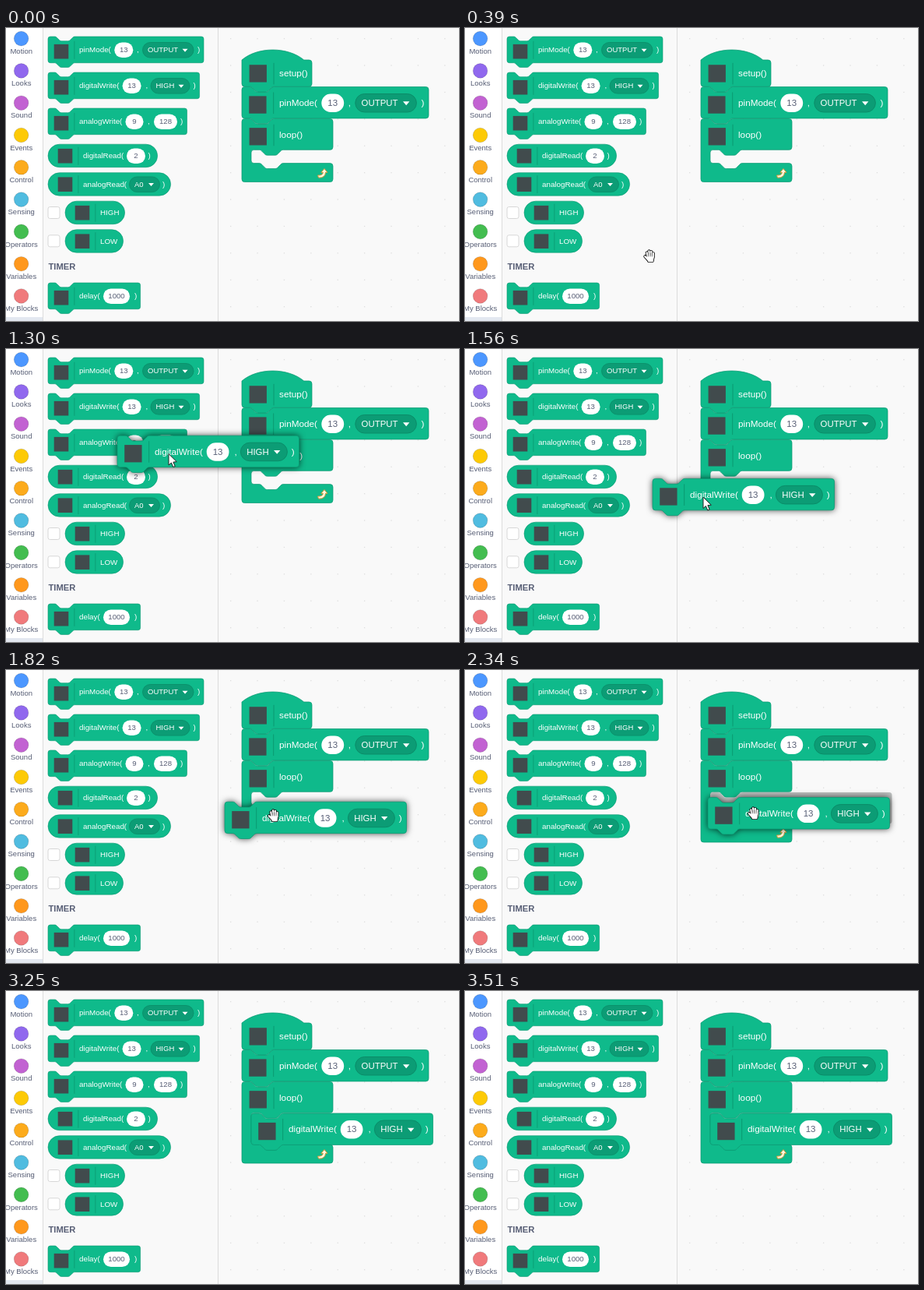
Recreate the animation shown at these times as an HTML page with a canvas. Size 582 px wide and 376 px high, loop 3.9 s.

```html
<!DOCTYPE html>
<html lang="en">
<head>
<meta charset="utf-8">
<title>Block editor</title>
<style>
html, body { margin: 0; width: 100%; height: 100%; overflow: hidden; background: #f9f9f9; }
canvas { display: block; width: 582px; height: 376px; }
</style>
</head>
<body>
<canvas id="stage"></canvas>
<script>
const W = 582, H = 376, LOOP = 3900, STEP = 130;
const GREEN = '#0fba8b', EDGE = '#0b9871', FIELD = '#0c9c75', TILE = '#414b4d';
const FONT = '"Liberation Sans", Arial, sans-serif';
const BIG = 1.2;

const canvas = document.getElementById('stage');
const c = canvas.getContext('2d');
const dpr = window.devicePixelRatio || 1;
canvas.width = W * dpr;
canvas.height = H * dpr;

const CATEGORIES = [
  ['Motion', '#4c97ff'], ['Looks', '#9068ee'], ['Sound', '#c262d2'],
  ['Events', '#fdca06'], ['Control', '#fcab1c'], ['Sensing', '#50bce0'],
  ['Operators', '#43bd50'], ['Variables', '#ff981d'], ['My Blocks', '#f07a7c']
];

// Block parts: label, number and menu, each with its offset in the block
const label = (x, s) => () => text(s, x, 0, 9.8, '#fff');
const number = (x, w, s) => () => {
  pill(x - w / 2, -9.8, w, 19.6, '#fff');
  text(s, x, 0, 9.6, '#575e75', 'center');
};
const menu = (x, w, s) => () => {
  pill(x, -9.8, w, 19.6, FIELD, '#0b8c68');
  text(s, x + 6.5, 0, 9.5, '#fff');
  c.fillStyle = '#fff';
  c.beginPath();
  c.moveTo(x + w - 14.5, -1.6);
  c.lineTo(x + w - 7.5, -1.6);
  c.lineTo(x + w - 11, 2.4);
  c.fill();
};

const stack = (w, ...parts) => ({ shape: stackPath, w, h: 33.7, mid: 17.3, icon: 19.2, left: 17, parts });
const reporter = (w, ...parts) => ({ shape: roundPath, w, h: 29.5, mid: 15, icon: 15, left: 22, parts });

const pinMode = stack(200, label(40, 'pinMode('), number(97.3, 24, '13'), label(114, ','),
  menu(121.5, 65.5, 'OUTPUT'), label(192, ')'));
const digitalWrite = stack(194.6, label(40, 'digitalWrite('), number(107.6, 24, '13'), label(125.5, ','),
  menu(132, 50, 'HIGH'), label(186.5, ')'));
const analogWrite = stack(178.5, label(40, 'analogWrite('), number(111, 23, '9'), label(128, ','),
  number(151, 30, '128'), label(170, ')'));
const delay = stack(118.6, label(40, 'delay('), number(88, 34, '1000'), label(111, ')'));
const digitalRead = reporter(140.6, label(45, 'digitalRead('), number(113, 24, '2'), label(128.5, ')'));
const analogRead = reporter(157.6, label(45, 'analogRead('), menu(104.5, 39, 'A0'), label(147, ')'));
const high = reporter(76.6, label(45, 'HIGH'));
const low = reporter(74.6, label(45, 'LOW'));
const setup = { shape: hatPath, w: 75, h: 28.5, mid: 14.7, icon: 14.5, left: 17.3, parts: [label(40, 'setup()')] };
const loopBlock = mouth => ({
  shape: loopPath, w: 97.5, h: 33.2 + mouth + 19.9, mouth, mid: 17.5, icon: 19, left: 17.3,
  parts: [label(40, 'loop()')]
});

function text(s, x, y, size, color, align = 'left', weight = 'normal') {
  c.font = `${weight} ${size}px ${FONT}`;
  c.textAlign = align;
  c.textBaseline = 'middle';
  c.fillStyle = color;
  c.fillText(s, x, y + 0.4);
}

function pill(x, y, w, h, fill, line, r = h / 2) {
  c.beginPath();
  c.roundRect(x, y, w, h, r);
  c.fillStyle = fill;
  c.fill();
  if (line) {
    c.lineWidth = 0.8;
    c.strokeStyle = line;
    c.stroke();
  }
}

// Connector bump, drawn rightwards (d = 1) or leftwards (d = -1)
function notch(x, y, d) {
  const s = 0.715, X = v => x + v * s * d, Y = v => y + v * s;
  const curve = (a, b, e, f, g, h) => c.bezierCurveTo(X(a), Y(b), X(e), Y(f), X(g), Y(h));
  c.lineTo(x, y);
  curve(2, 0, 3, 1, 4, 2);
  c.lineTo(X(8), Y(6));
  curve(9, 7, 10, 8, 12, 8);
  c.lineTo(X(24), Y(8));
  curve(26, 8, 27, 7, 28, 6);
  c.lineTo(X(32), Y(2));
  curve(33, 1, 34, 0, 36, 0);
}

const IN = 8.6, OUT = 34.3;

function topEdge() {
  c.moveTo(0, 3);
  c.arcTo(0, 0, 3, 0, 3);
  notch(IN, 0, 1);
}

function sides({ w, h }) {
  c.arcTo(w, 0, w, h, 3);
  c.arcTo(w, h, 0, h, 3);
  notch(OUT, h, -1);
  c.arcTo(0, h, 0, 0, 3);
}

function stackPath(b) {
  topEdge();
  sides(b);
}

function hatPath(b) {
  c.moveTo(0, 0);
  c.bezierCurveTo(17, -14.4, 49, -14.4, 66.5, 0);
  sides(b);
}

function loopPath({ w, h, mouth }) {
  const a = 33.2, e = a + mouth, arm = 10;
  topEdge();
  c.arcTo(w, 0, w, a, 3);
  c.arcTo(w, a, arm, a, 3);
  notch(arm + OUT, a, -1);
  c.arcTo(arm, a, arm, e, 3);
  c.arcTo(arm, e, w, e, 3);
  notch(arm + IN, e, 1);
  c.arcTo(w, e, w, h, 3);
  c.arcTo(w, h, 0, h, 3);
  c.arcTo(0, h, 0, 0, 3);
}

function roundPath({ w, h }) {
  c.roundRect(0, 0, w, h, h / 2);
}

function block(b, x, y, k = 1, lifted = false) {
  c.save();
  c.translate(x, y);
  c.scale(k, k);
  c.beginPath();
  b.shape(b);
  c.closePath();
  c.save();
  if (lifted) {
    c.shadowColor = 'rgba(0,0,0,.75)';
    c.shadowBlur = 8 * dpr;
  }
  c.fillStyle = GREEN;
  c.fill();
  c.restore();
  c.strokeStyle = EDGE;
  c.lineWidth = 0.6;
  c.stroke();
  c.fillStyle = TILE;
  c.fillRect(b.left - 9.3, b.icon - 9.3, 18.6, 18.6);
  c.fillStyle = EDGE;
  c.fillRect(b.left + 16.5, b.mid - 11.5, 0.8, 23);
  c.translate(0, b.mid);
  b.parts.forEach(draw => draw());
  c.restore();
}

function ghost(b, x, y) {
  c.save();
  c.translate(x, y);
  c.scale(BIG, BIG);
  c.beginPath();
  b.shape(b);
  c.fillStyle = '#bcbfbe';
  c.fill();
  c.restore();
}

function repeatArrow(x, y) {
  c.save();
  c.translate(x, y);
  c.lineJoin = 'round';
  c.beginPath();
  c.moveTo(-5.5, 2.5);
  c.quadraticCurveTo(1, 3, 1.3, -1.2);
  c.lineTo(-1.2, -1.2);
  c.lineTo(3, -6);
  c.lineTo(7, -1.2);
  c.lineTo(4.6, -1.2);
  c.quadraticCurveTo(4, 6.2, -4.5, 5.6);
  c.closePath();
  c.fillStyle = '#fff6df';
  c.strokeStyle = '#c99a35';
  c.lineWidth = 1;
  c.fill();
  c.stroke();
  c.restore();
}

function hand(x, y) {
  c.save();
  c.translate(x, y);
  c.lineCap = c.lineJoin = 'round';
  for (const [grow, color] of [[1.8, '#111'], [0, '#fff']]) {
    c.strokeStyle = c.fillStyle = color;
    c.lineWidth = 2.3 + grow;
    c.beginPath();
    for (const [x0, y0] of [[-3.6, -4.6], [-0.9, -6.6], [1.9, -6], [4.5, -3.8]]) {
      c.moveTo(x0, y0);
      c.lineTo(x0 * 0.8 + 0.6, 1.5);
    }
    c.moveTo(-6, 0.2);
    c.lineTo(-2, 4.5);
    c.stroke();
    c.beginPath();
    c.moveTo(-2.6, 0.5);
    c.lineTo(4.2, 0.5);
    c.lineTo(3.4, 6);
    c.lineTo(-1.2, 6);
    c.closePath();
    c.fill();
    c.stroke();
  }
  c.strokeStyle = '#333';
  c.lineWidth = 0.7;
  c.beginPath();
  for (const fx of [-2, 0.6, 3]) {
    c.moveTo(fx, -4);
    c.lineTo(fx, 0);
  }
  c.stroke();
  c.restore();
}

function arrow(x, y) {
  c.save();
  c.translate(x, y);
  c.beginPath();
  [[0, 0], [0, 14.5], [3.4, 11.5], [5.8, 17], [8.2, 16], [5.9, 10.6], [10.3, 10.2]]
    .forEach(p => c.lineTo(...p));
  c.closePath();
  c.fillStyle = '#fff';
  c.strokeStyle = '#222';
  c.lineWidth = 1;
  c.fill();
  c.stroke();
  c.restore();
}

function along(path, t) {
  let i = 0;
  while (i < path.length - 2 && t > path[i + 1][0]) i++;
  const [t0, x0, y0] = path[i], [t1, x1, y1] = path[i + 1];
  const p = Math.min(1, Math.max(0, (t - t0) / (t1 - t0)));
  return [x0 + (x1 - x0) * p, y0 + (y1 - y0) * p];
}

// Each entry: step, x, y
const POINTER = [[2, 300, 400], [5, 112, 79], [8, 112, 79], [12, 306, 190],
  [14, 344, 187], [18, 371, 184], [19, 371, 184], [22, 362, 226], [25, 356, 400]];
const DRAG = [[8, 45, 56], [12, 241, 166.4], [14, 281, 169.2], [18, 312, 163.6]];
const LIFT = 9, NEAR = 16, DROP = 19;

function panels() {
  c.fillStyle = '#f9f9f9';
  c.fillRect(0, 0, W, H);
  c.fillStyle = '#dedede';
  for (let x = 288; x < W; x += 34.4)
    for (let y = 13; y < H; y += 34.4) c.fillRect(x, y, 1.3, 1.3);
  c.fillStyle = '#fff';
  c.fillRect(0, 0, 47, H);
  c.fillStyle = '#e3e8f0';
  c.fillRect(0, 371, 47, 5);
  c.fillStyle = '#dcdcdc';
  c.fillRect(47, 0, 1, H);
  c.fillRect(272, 0, 1, H);
  CATEGORIES.forEach(([name, color], i) => {
    const y = 13.6 + i * 41.3;
    c.beginPath();
    c.arc(19.6, y, 9.3, 0, 7);
    c.fillStyle = color;
    c.fill();
    c.strokeStyle = 'rgba(0,0,0,.16)';
    c.lineWidth = 0.9;
    c.stroke();
    text(name, 19.7, y + 16.1, 9.5, '#575e75', 'center');
  });
}

function palette() {
  block(pinMode, 54, 11);
  block(digitalWrite, 54, 57);
  block(analogWrite, 54, 103);
  block(digitalRead, 54, 149.2);
  block(analogRead, 54, 185.7);
  block(high, 76, 222.2);
  block(low, 76, 258.7);
  block(delay, 54, 327);
  for (const y of [229.5, 265.8]) pill(54, y, 15, 15, '#fff', '#cfcfcf', 2.5);
  text('TIMER', 54.5, 307, 11.2, '#575e75', 'left', 'bold');
}

function draw(t) {
  const open = t >= NEAR, mouth = open ? 34 : 14.4;
  c.setTransform(dpr, 0, 0, dpr, 0, 0);
  panels();
  palette();
  block(loopBlock(mouth), 303, 116.5, BIG);
  repeatArrow(406, open ? 209.5 : 186.5);
  block(pinMode, 303, 75.5, BIG);
  block(setup, 303, 41, BIG);
  if (t >= DROP) block(digitalWrite, 315, 157, BIG);
  else if (t >= LIFT) {
    if (open) ghost(digitalWrite, 315, 157);
    block(digitalWrite, ...along(DRAG, t), BIG, true);
  }
  const pointer = t >= 10 && t < 14 ? arrow : hand;
  if (t > 2 && t < 25) pointer(...along(POINTER, t));
}

const start = performance.now();

function frame() {
  draw(Math.floor((performance.now() - start) % LOOP / STEP));
  requestAnimationFrame(frame);
}

frame();
</script>
</body>
</html>
```
